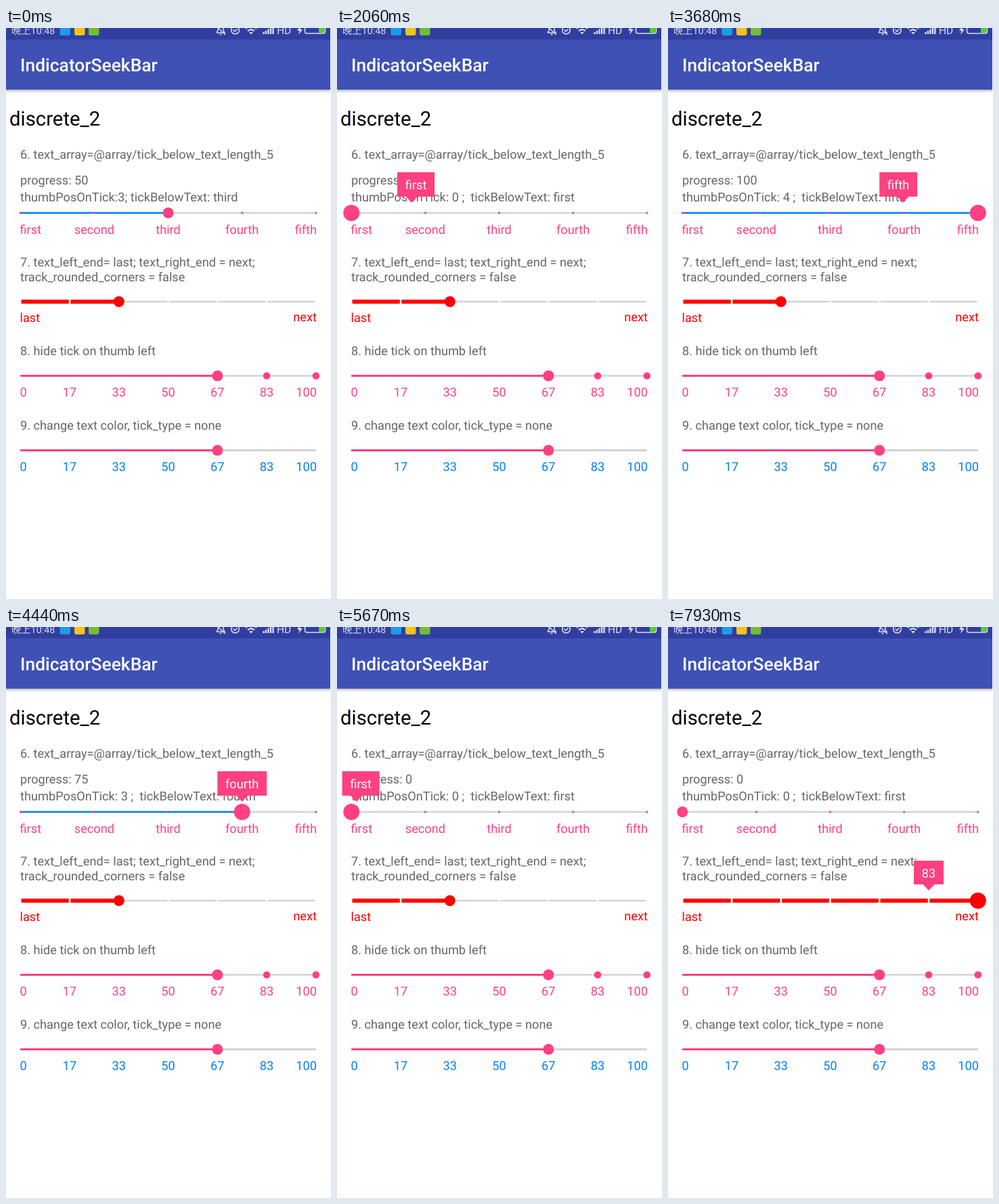
Write an HTML page that moves like this. It is 480x843 px and loops after 8 s.

```html
<!DOCTYPE html>
<html lang="en">
<head>
<meta charset="utf-8">
<title>Discrete seek bars</title>
<style>
  html, body { margin: 0; width: 100%; height: 100%; overflow: hidden; background: #fff; }
  svg { display: block; width: 480px; height: 843px; }
  text { font: 18.2px Roboto, sans-serif; fill: #666; white-space: pre; text-rendering: geometricPrecision; }
  .title { font-size: 26.4px; font-weight: 500; fill: #fff; }
  .heading { font-size: 29.33px; fill: #000; }
  .status { font: 15.6px Roboto, sans-serif; fill: #d6d9ec; }
  .clock { font: 14.3px Roboto, "Noto Sans CJK SC", sans-serif; fill: #d6d9ec; }
  .bubble text { fill: #fff; }
</style>
</head>
<body>
<svg id="stage" viewBox="0 0 480 843"></svg>
<script>
const PINK = '#ff4081', BLUE = '#007fff', RED = '#ff0000', GRAY = '#d3d3d3';
const LEFT = 21.3, RIGHT = 457.8, SCREEN = 479;
const LOOP = 8000, STEP = 95.5, SLIDE = 300;
const NAMES = ['first', 'second', 'third', 'fourth', 'fifth'];
const PERCENTS = [0, 17, 33, 50, 67, 83, 100];

const tickX = (i, count) => LEFT + (RIGHT - LEFT) * i / (count - 1);
const clamp = (v, lo, hi) => Math.max(lo, Math.min(hi, v));

// Markup helpers
const text = (x, y, s, attrs = '') => `<text x="${x}" y="${y}" ${attrs}>${s}</text>`;
const line = (y, x1, x2, color, width, attrs = '') =>
  `<path d="M${x1} ${y}H${x2}" stroke="${color}" stroke-width="${width}" ${attrs}/>`;
const dot = (x, y, r, color, attrs = '') => `<circle cx="${x}" cy="${y}" r="${r}" fill="${color}" ${attrs}/>`;
const rect = (x, y, w, h, color, attrs = '') =>
  `<rect x="${x}" y="${y}" width="${w}" height="${h}" fill="${color}" ${attrs}/>`;
const ticks = (count, draw) => Array.from({ length: count }, (_, i) => draw(tickX(i, count))).join('');

function labels(list, y, color) {
  return list.map((s, i) => {
    const last = list.length - 1;
    const x = i === 0 ? 20.5 : i === last ? 459 : tickX(i, list.length);
    const anchor = i === 0 ? 'start' : i === last ? 'end' : 'middle';
    return text(x, y, s, `text-anchor="${anchor}" style="fill:${color}"`);
  }).join('');
}

const bubbleMarkup = id =>
  `<g id="${id}" class="bubble"><path fill="${PINK}"/><text text-anchor="middle"></text></g>`;

const statusBar = `
  ${rect(0, 0, SCREEN, 17, '#303f9f')}
  ${text(8, 8.5, '晚上10:48', 'class="clock"')}
  ${rect(79.5, -4, 15.5, 15, '#1e9be8', 'rx="3"')}
  ${rect(101, -4, 15.5, 15, '#f3c21b', 'rx="3"')}
  ${rect(122, -4, 15.5, 15, '#72bd35', 'rx="3"')}
  <g fill="none" stroke="#d6d9ec" stroke-width="1.6">
    <path d="M311 7H323L321 4V-2M313 -2V4L311 7M315.500 9.500H318.500M310 -3L324 10"/>
    <circle cx="338.500" cy="3" r="5.800"/><path d="M335.500 2.500L338 5L341.500 1.500"/>
    <path d="M354 1Q362 -6 370 1M357 4.500Q362 0 367 4.500" stroke-width="2.200"/>
    <path d="M380.500 9V6M384 9V4M387.500 9V1.500M391 9V-1M394.500 9V-4" stroke-width="2.400"/>
    <rect x="441.500" y="-6" width="30" height="14" rx="3"/>
  </g>
  <path d="M359 6H365L362 9.500ZM435 -4L430 4H433.500L432 10L438 2H434.500Z" fill="#d6d9ec"/>
  ${text(400, 9, 'HD', 'class="status"')}
  ${rect(462, -5, 8.5, 12, '#58d02c', 'rx="1"')}`;

const stage = document.getElementById('stage');
stage.innerHTML = `
  <defs><linearGradient id="shadow" x2="0" y2="1">
    <stop stop-color="#000" stop-opacity=".25"/><stop offset="1" stop-color="#000" stop-opacity="0"/>
  </linearGradient></defs>
  ${rect(0, 0, 480, 843, '#fff')}
  ${rect(0, 91, SCREEN, 5, 'url(#shadow)')}
  ${rect(0, 17, SCREEN, 74, '#3f51b5')}
  ${statusBar}
  ${text(21, 64, 'IndicatorSeekBar', 'class="title"')}
  ${text(5, 144, 'discrete_2', 'class="heading"')}

  ${text(21, 192.5, '6. text_array=@array/tick_below_text_length_5')}
  ${text(21, 231, '', 'id="progress"')}
  ${text(21, 255.5, '', 'id="position"')}
  ${line(273, LEFT, RIGHT, GRAY, 2.3)}
  ${line(273, LEFT, LEFT, BLUE, 2.7, 'id="namedTrack"')}
  ${ticks(5, x => rect(x - 1.4, 271.6, 2.8, 2.8, PINK))}
  ${dot(LEFT, 273, 8, PINK, 'id="namedThumb"')}
  ${labels(NAMES, 303.5, PINK)}

  ${text(21, 352, '7. text_left_end= last; text_right_end = next;')}
  ${text(21, 373.5, 'track_rounded_corners = false')}
  ${line(404, LEFT, RIGHT, GRAY, 2.3)}
  ${line(404, LEFT, LEFT, RED, 6.2, 'id="redTrack"')}
  ${ticks(7, x => rect(x - 1.3, 400, 2.6, 8, '#fff'))}
  ${dot(LEFT, 404, 8, RED, 'id="redThumb"')}
  ${text(20.5, 434, 'last', `style="fill:${RED}"`)}
  ${text(459, 432.5, 'next', `text-anchor="end" style="fill:${RED}"`)}

  ${text(21, 483, '8. hide tick on thumb left')}
  ${line(513.5, LEFT + 1, RIGHT - 1, GRAY, 2.6, 'stroke-linecap="round"')}
  ${line(513.5, LEFT + 1, tickX(4, 7), PINK, 3, 'stroke-linecap="round"')}
  ${dot(tickX(4, 7), 513.5, 8, PINK)}
  ${dot(tickX(5, 7), 513.5, 5.3, PINK)}
  ${dot(RIGHT, 513.5, 5.3, PINK)}
  ${labels(PERCENTS, 544, PINK)}

  ${text(21, 593, '9. change text color, tick_type = none')}
  ${line(623.5, LEFT + 1, RIGHT - 1, GRAY, 2.8, 'stroke-linecap="round"')}
  ${line(623.5, LEFT + 1, tickX(4, 7), PINK, 3, 'stroke-linecap="round"')}
  ${dot(tickX(4, 7), 623.5, 8, PINK)}
  ${labels(PERCENTS, 654, BLUE)}
  ${bubbleMarkup('namedBubble')}${bubbleMarkup('redBubble')}`;

const el = id => document.getElementById(id);

// Each move: time it shows, tick index, time the bubble window starts sliding
const named = {
  list: NAMES, top: 213, height: 36, show: 1000, hide: 6060,
  moves: [[0, 2, 0], [1470, 1, 1535], [2060, 0, 2125], [2630, 1, 2608], [2910, 2, 2915], [3200, 3, 3240],
    [3680, 4, 3745], [4160, 3, 4150], [4630, 2, 4695], [5100, 1, 5090], [5490, 0, 5563]],
};
const red = {
  list: PERCENTS, top: 345, height: 35, show: 6680, hide: LOOP,
  moves: [[6820, 1, 6500], [6910, 2, 6840], [7190, 3, 7140], [7450, 4, 7100], [7630, 5, 7280]],
};
const redThumbMoves = [[0, 2], [6590, 1], [6910, 2], [7190, 3], [7450, 4], [7630, 5], [7930, 6]];

const currentIndex = (moves, t) => moves.findLastIndex(m => m[0] <= t);

function drawBar(id, y, x, pressed) {
  el(id + 'Track').setAttribute('d', `M${LEFT} ${y}H${x}`);
  el(id + 'Thumb').setAttribute('cx', x);
  el(id + 'Thumb').setAttribute('r', pressed ? 12 : 8);
}

function drawBubble(id, bar, t, held) {
  const group = el(id + 'Bubble'), [shape, label] = group.children;
  const i = currentIndex(bar.moves, t);
  const fadeOut = t < bar.hide ? 1 : t < bar.hide + 90 ? 0.5 : 0;
  const opacity = i < 0 ? 0 : clamp((held - bar.show) / 300, 0, 1) * fadeOut;
  group.setAttribute('opacity', opacity);
  if (!opacity) return;

  const place = tick => {
    label.textContent = bar.list[tick];
    const width = label.getComputedTextLength() + 23.5;
    const x = tickX(tick, bar.list.length);
    return { x, width, left: clamp(x - width / 2, 0, SCREEN - width) };
  };
  const [, tick, start] = bar.moves[i];
  const from = place(bar.moves[Math.max(0, i - 1)][1]).left;
  const { x, width, left: goal } = place(tick);
  const eased = 1 - (1 - clamp((held - start) / SLIDE, 0, 1)) ** 5;
  const left = from + (goal - from) * eased;
  const tip = left + x - goal, bottom = bar.top + bar.height;
  shape.setAttribute('d',
    `M${left} ${bar.top}h${width}V${bottom}H${tip + 8.5}L${tip} ${bottom + 9}L${tip - 8.5} ${bottom}H${left}Z`);
  label.setAttribute('x', left + width / 2);
  label.setAttribute('y', bar.top + 25);
}

function draw(t) {
  // The bubble window refreshes in fixed steps
  const held = 1000 + Math.floor((t - 985) / STEP) * STEP;

  const moveIndex = currentIndex(named.moves, t), tick = named.moves[moveIndex][1];
  el('progress').textContent = `progress: ${tick * 25}`;
  el('position').textContent = moveIndex
    ? `thumbPosOnTick: ${tick} ;  tickBelowText: ${NAMES[tick]}`
    : 'thumbPosOnTick:3; tickBelowText: third';
  drawBar('named', 273, tickX(tick, 5), t >= named.show && t < named.hide);
  drawBubble('named', named, t, held);

  const redTick = redThumbMoves[currentIndex(redThumbMoves, t)][1];
  drawBar('red', 404, tickX(redTick, 7), t >= 6590);
  drawBubble('red', red, t, held);
}

const began = performance.now();
function frame() {
  draw((performance.now() - began) % LOOP);
  requestAnimationFrame(frame);
}
frame();
</script>
</body>
</html>
```
